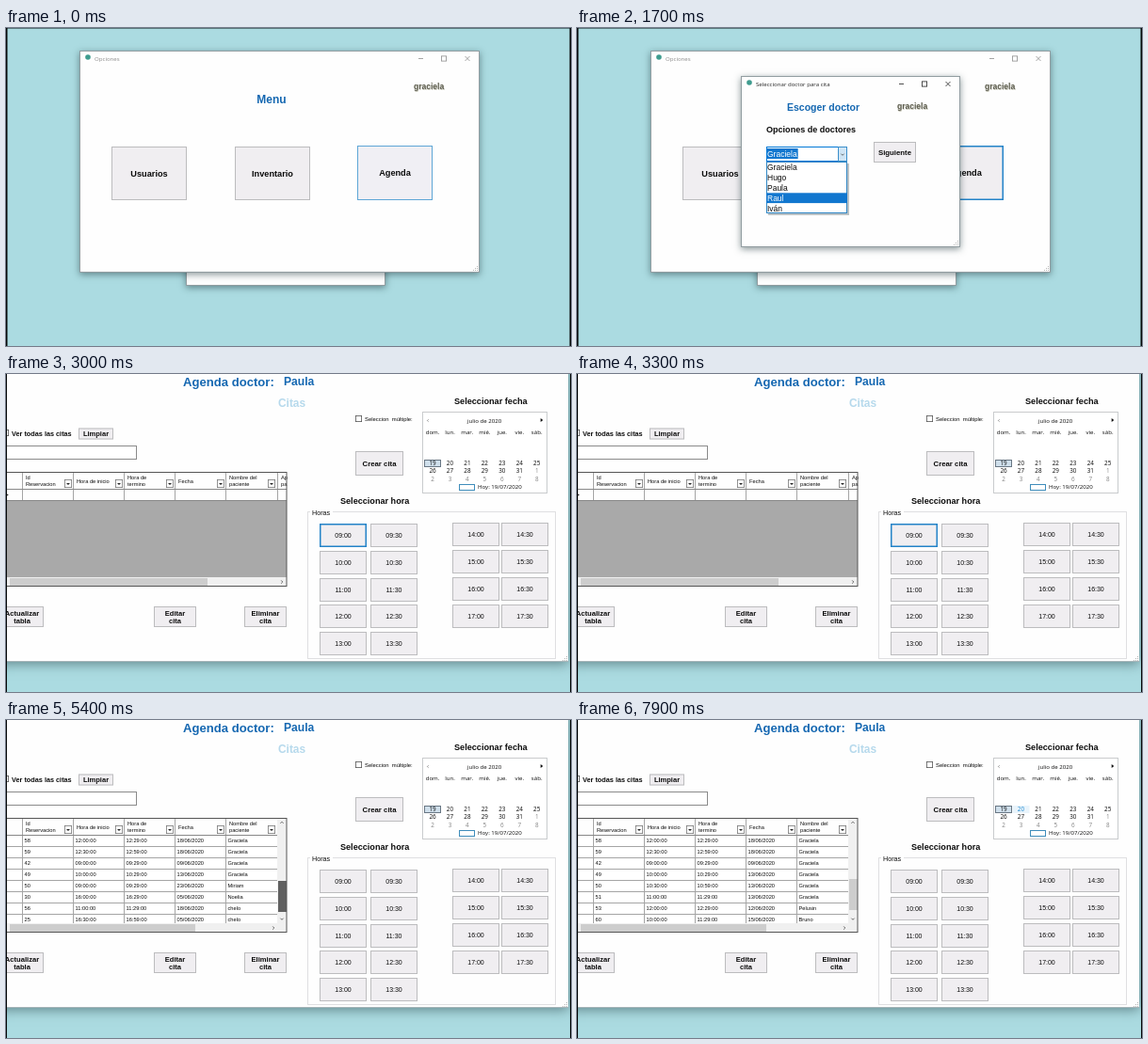
An HTML page with a canvas that plays this animation: 600x338 px, repeating every 8 s.

```html
<!DOCTYPE html>
<html lang="es">
<head>
<meta charset="utf-8">
<title>Agenda</title>
<style>
html, body { margin: 0; width: 100%; height: 100%; overflow: hidden; background: #abdbe1; }
canvas { display: block; }
</style>
</head>
<body>
<canvas id="stage" width="600" height="338"></canvas>
<script>
const ctx = document.getElementById('stage').getContext('2d');
const LOOP = 8000, DIALOG_OPENS = 500, AGENDA_OPENS = 3000;
const SANS = '"Liberation Sans", Arial, sans-serif';
const UI = '"Open Sans", "Noto Sans", sans-serif';
const BLUE = '#0078d7', TEAL = '#abdbe1', INK = '#0c0c0c';
const USER = 'graciela';
const DOCTORS = ['Graciela', 'Hugo', 'Paula', 'Raul', 'Iván'];

const APPOINTMENTS = `
21|09:00:00|09:29:00|02/06/2020|Graciela
22|09:30:00|09:59:00|02/06/2020|Graciela
23|11:00:00|11:29:00|03/06/2020|Miriam
24|15:00:00|15:29:00|04/06/2020|Noelia
50|09:00:00|09:29:00|23/06/2020|Miriam
30|16:00:00|16:29:00|05/06/2020|Noelia
56|11:00:00|11:29:00|18/06/2020|chelo
25|16:30:00|16:59:00|05/06/2020|chelo
58|12:00:00|12:29:00|18/06/2020|Graciela
59|12:30:00|12:59:00|18/06/2020|Graciela
42|09:00:00|09:29:00|09/06/2020|Graciela
49|10:00:00|10:29:00|13/06/2020|Graciela
50|10:30:00|10:59:00|13/06/2020|Graciela
51|11:00:00|11:29:00|13/06/2020|Graciela
53|12:00:00|12:29:00|12/06/2020|Pelusin
60|10:00:00|11:29:00|15/06/2020|Bruno`.trim().split('\n').map(row => row.split('|'));

// Last value whose start time has been reached.
function at(t, steps) {
  let value = null;
  for (const [start, v] of steps) if (t >= start) value = v;
  return value;
}
const clamp = v => Math.max(0, Math.min(1, v));

function text(str, x, y, size, { bold, color = INK, align = 'left', font = SANS } = {}) {
  ctx.font = `${bold ? 'bold ' : ''}${size}px ${font}`;
  ctx.textAlign = align;
  ctx.fillStyle = color;
  ctx.fillText(str, x, y + size * 0.36);
}

function fill(x, y, w, h, color) {
  ctx.fillStyle = color;
  ctx.fillRect(x, y, w, h);
}

function box(x, y, w, h, bg, border, line = 1) {
  if (bg) fill(x, y, w, h, bg);
  ctx.strokeStyle = border;
  ctx.lineWidth = line;
  ctx.strokeRect(x + line / 2, y + line / 2, w - line, h - line);
}

function path(points, color, line = 0.8) {
  ctx.beginPath();
  points.forEach(([x, y], i) => i ? ctx.lineTo(x, y) : ctx.moveTo(x, y));
  ctx.strokeStyle = color;
  ctx.lineWidth = line;
  ctx.stroke();
}

function chevron(x, y, dx, dy, color = '#444') {
  path([[x - dx - dy * 2, y - dy - dx * 2], [x + dx, y + dy], [x - dx + dy * 2, y - dy + dx * 2]], color);
}

function triangle(x, y, w, h, color) {
  ctx.beginPath();
  if (h) { ctx.moveTo(x - w, y - h); ctx.lineTo(x + w, y - h); ctx.lineTo(x, y + h); }
  else { ctx.moveTo(x - w, y - 2); ctx.lineTo(x - w, y + 2); ctx.lineTo(x + w, y); }
  ctx.fillStyle = color;
  ctx.fill();
}

function button(label, x, y, w, h, size, { bold = true, hover, focus } = {}) {
  const border = hover ? '#5ea6d6' : focus ? '#2383c8' : '#bcbcbe';
  box(x, y, w, h, hover ? '#f0eff4' : '#f0eef1', border, focus && !hover ? 1.5 : 1);
  const lines = label.split('\n');
  lines.forEach((line, i) => {
    const cy = y + h / 2 + (i - (lines.length - 1) / 2) * 8;
    text(line, x + w / 2, cy, size, { bold, align: 'center' });
  });
}

function shadowed(x, y, w, h, blur) {
  ctx.save();
  ctx.shadowColor = 'rgba(20,45,50,.5)';
  ctx.shadowBlur = blur;
  ctx.shadowOffsetY = 2;
  fill(x, y, w, h, '#fefefe');
  ctx.restore();
}

function windowFrame(x, y, w, h, title, active) {
  shadowed(x, y, w, h, 7);
  box(x, y, w, h, '#fefefe', '#929da1');
  if (!title) return;
  const color = active ? '#222' : '#8d8d8d', cy = y + 8;
  ctx.beginPath();
  ctx.arc(x + 9, cy - 1, 2.8, 0, Math.PI * 2);
  ctx.fillStyle = '#3f9c8f';
  ctx.fill();
  text(title, x + 16, cy + 0.5, 6.1, { font: UI, color });
  const r = x + w - 13;
  path([[r - 52, cy + 0.5], [r - 47, cy + 0.5]], color);
  box(r - 28, cy - 2.5, 6, 6, null, color, 0.8);
  path([[r - 2.5, cy - 2], [r + 2.5, cy + 3]], color);
  path([[r - 2.5, cy + 3], [r + 2.5, cy - 2]], color);
  grip(x + w - 2, y + h - 2);
}

function grip(x, y) {
  for (let i = 0; i < 3; i++)
    for (let j = 0; j <= i; j++) fill(x - 1 - j * 2, y - 5 + i * 2, 1, 1, '#b5b5b5');
}

function userName(x, y) {
  text(USER, x + 0.5, y + 0.6, 8.5, { bold: true, color: '#c9c9bb' });
  text(USER, x, y, 8.5, { bold: true, color: '#5c5c4e' });
}

function drawMenu(t) {
  windowFrame(191, 200, 212, 74);
  windowFrame(78, 24, 425, 236, 'Opciones', false);
  text('Menu', 282, 76, 12, { bold: true, align: 'center', color: '#1467b1' });
  userName(433, 62);
  button('Usuarios', 112, 126, 80, 57, 9.2);
  button('Inventario', 243, 126, 80, 57, 9.2);
  button('Agenda', 373, 125, 80, 58, 9.2, { hover: t < 300, focus: true });
}

function drawDialog(t) {
  windowFrame(174, 51, 233, 182, 'Seleccionar doctor para cita', t < 2900);
  text('Escoger doctor', 223, 84, 10.5, { bold: true, color: '#1467b1' });
  userName(340, 83);
  text('Opciones de doctores', 201, 108, 9.05, { bold: true });
  button('Siguiente', 315, 121, 45, 22, 7.8, { hover: t >= 2600 });

  const open = t >= 1400 && t < 2300;
  const chosen = DOCTORS[t < 2300 ? 0 : 2];
  box(201, 126, 86, 16, '#fff', open ? BLUE : '#7d8ea0');
  if (open) box(277, 126, 10, 16, '#cfe5f5', '#3b8fcb');
  chevron(282, 134.5, 0, 0.8);
  const selected = t < 2700;
  if (selected) {
    ctx.font = `8.5px ${SANS}`;
    fill(202, 128, ctx.measureText(chosen).width + 1, 11, '#1177cf');
  }
  text(chosen, 202, 134, 8.5, { color: selected ? '#fff' : INK });
  if (!open) return;

  fill(203, 144, 86, 55, 'rgba(60,80,90,.35)');
  box(201, 142, 86, 55, '#fff', '#2f86c4');
  const hot = at(t, [[1400, 0], [1500, 1], [1600, 2], [1700, 3], [1900, 4], [2000, 3], [2100, 2]]);
  DOCTORS.forEach((name, i) => {
    const y = 148.3 + i * 10.8;
    if (i === hot) fill(201, y - 5.4, 86, 10.8, '#1177cf');
    text(name, 202, y, 8.5, { color: i === hot ? '#fff' : INK });
  });
}

function drawCalendar(t) {
  const centered = { font: UI, align: 'center' };
  const hot = at(t, [[0, null], [7600, 20], [7800, 19], [7900, 20]]);
  const column = i => 453 + i * 18.45;
  box(442, 40, 133, 87, '#fff', '#c9cbcd');
  text('julio de 2020', 508, 50, 6.1, centered);
  chevron(448, 49.5, -0.6, 0, '#777');
  triangle(569, 49, 1.3, 0, '#111');
  'dom. lun. mar. mié. jue. vie. sáb.'.split(' ').forEach((d, i) => text(d, column(i), 62, 6.1, centered));
  box(444, 91, 18, 8, '#cfdfeb', '#687683');
  for (let i = 0; i < 21; i++) {
    const day = 19 + i, next = day > 31;
    const color = day === hot ? '#1a86d0' : next ? '#858585' : INK;
    const x = column(i % 7), y = 95 + Math.floor(i / 7) * 8.2;
    if (day === hot && day > 19) fill(x - 9, 91, 18, 8, '#e9f4fb');
    text(next ? day - 31 : day, x, y, 6.3, { ...centered, color });
  }
  box(481, 117, 17, 7, '#fff', '#3f8dbb');
  text('Hoy: 19/07/2020', 501, 120, 6.1, { font: UI });
}

function drawHours(hot, focused) {
  box(320, 146, 264, 157, null, '#dfdfe1');
  fill(323, 143, 24, 8, '#fefefe');
  text('Horas', 325, 147, 7.2);
  for (let i = 0; i < 18; i++) {
    const afternoon = i >= 10, k = afternoon ? i - 10 : i, row = k >> 1;
    const label = `${String(9 + (i >> 1)).padStart(2, '0')}:${i % 2 ? '30' : '00'}`;
    const x = (afternoon ? [474, 526] : [333, 387])[k % 2];
    const y = afternoon ? 158 + row * 29 : Math.round(159 + row * 28.8);
    button(label, x, y, 50, 25, 7, { bold: false, hover: hot === label, focus: label === focused });
  }
}

function drawTable(t) {
  const filled = t >= 4200;
  const lines = [17, 71, 125, 179, 233, 288];
  const heads = ['Id\nReservacion', 'Hora de inicio', 'Hora de\ntermino', 'Fecha', 'Nombre del\npaciente', 'Ap\npa'];
  const ROW = 11.95;

  ctx.save();
  ctx.beginPath();
  ctx.rect(0, 104, 299, 122);
  ctx.clip();
  fill(0, 104, 298, 122, filled ? '#fff' : '#a9a9a9');
  fill(0, 104, 298, filled ? 18 : 30, '#fefefe');
  lines.forEach((x, i) => {
    fill(x, 105, 1, filled ? 112 : 29, '#a5a5a5');
    if (filled && i === 5) return;
    const parts = heads[i].split('\n');
    parts.forEach((p, j) => text(p, x + 4, (parts.length > 1 ? 110 : 114) + j * 7, 5.7));
    if (i < 5) {
      box(x + 45, 112, 8, 9, '#fff', '#777', 0.8);
      triangle(x + 49, 117, 2, 1, '#222');
    }
  });
  fill(0, 122, 298, 1, '#888');

  if (filled) {
    for (let i = 0; i < 8; i++) {
      const settled = t >= 5500 || (t >= 5300 && i < 4);
      const y = 128.3 + i * ROW;
      APPOINTMENTS[i + (settled ? 8 : 0)].forEach((cell, j) => text(cell, lines[j] + 2.5, y, 5.7));
      fill(0, Math.round(y + 5.7), 288, 1, '#a5a5a5');
    }
    const thumb = t < 5500 ? 114 + 57 * clamp((t - 5150) / 250) : 169;
    fill(288, 105, 10, 121, '#f0f0f0');
    fill(289, thumb, 9, 33, t >= 5150 && t < 5600 ? '#606060' : '#cdcdcd');
    chevron(293, 109, 0, -0.8);
    chevron(293, 211.5, 0, 0.8);
  } else {
    fill(0, 134, 298, 1, '#888');
    triangle(1, 128.5, 1.8, 0, '#222');
  }
  fill(0, 216, 298, 9, '#f0f0f0');
  fill(4, 217, filled ? 197 : 210, 8, '#cdcdcd');
  chevron(filled ? 284 : 293, 221, 0.8, 0);
  ctx.restore();
  box(-2, 104, 300.5, 122, null, '#555');
}

function drawAgenda(t) {
  const hot = at(t, [
    [0, null], [4800, 'search'], [5000, 'Limpiar'], [5100, null],
    [6000, 'Eliminar'], [6200, 'Editar'], [6400, 'Actualizar'], [6600, 'Editar'],
    [6700, 'Eliminar'], [6900, null], [7000, '13:00'], [7050, '12:00'],
    [7100, '11:00'], [7150, '10:00'], [7200, '09:00'], [7300, null]
  ]);
  shadowed(-10, -10, 607, 316, 12);
  fill(0, 305, 597, 1, '#a3b3b7');
  grip(596, 305);

  text('Agenda doctor:', 188, 8, 13.1, { bold: true, color: '#1467b1' });
  text(DOCTORS[2], 295, 8, 12.1, { bold: true, color: '#1467b1' });
  text('Citas', 289, 31, 11.9, { bold: true, color: '#b6d9ec' });
  text('Seleccionar fecha', 476, 29, 9.15, { bold: true });
  text('Seleccionar hora', 355, 135, 9.1, { bold: true });
  box(371, 44, 7, 7, '#fff', '#555', 0.8);
  text('Seleccion  múltiple:', 381, 47.5, 5.9);
  box(-4, 59, 7, 7, '#fff', '#555', 0.8);
  text('Ver todas las citas', 6, 63, 7.3, { bold: true });
  box(-2, 76, 141, 15, '#fff', hot === 'search' ? '#222' : '#8a8a8a');

  button('Limpiar', 77, 57.5, 37, 12, 7.5, { hover: hot === 'Limpiar' });
  button('Crear cita', 371, 82, 51, 26, 7.8);
  [['Actualizar', 'tabla', -6], ['Editar', 'cita', 157], ['Eliminar', 'cita', 253]].forEach(([verb, noun, x]) =>
    button(`${verb}\n${noun}`, x, 247, x < 0 ? 46 : 45, 22, 7.6, { hover: hot === verb }));
  drawTable(t);
  drawCalendar(t);
  drawHours(hot, t < 4200 ? '09:00' : null);
}

function render(t) {
  const agenda = t >= AGENDA_OPENS;
  fill(0, 0, 600, 338, TEAL);
  if (agenda) drawAgenda(t);
  else {
    drawMenu(t);
    if (t >= DIALOG_OPENS) drawDialog(t);
    fill(0, 0, 600, 0.6, '#27383a');
  }
  const edge = agenda ? 1 : 1.5;
  fill(0, 0, edge, 338, '#050808');
  fill(600 - edge, 0, edge, 338, '#050808');
}

const begin = performance.now();
function tick(now) {
  render(Math.max(0, now - begin) % LOOP);
  requestAnimationFrame(tick);
}
tick(begin);
</script>
</body>
</html>
```
